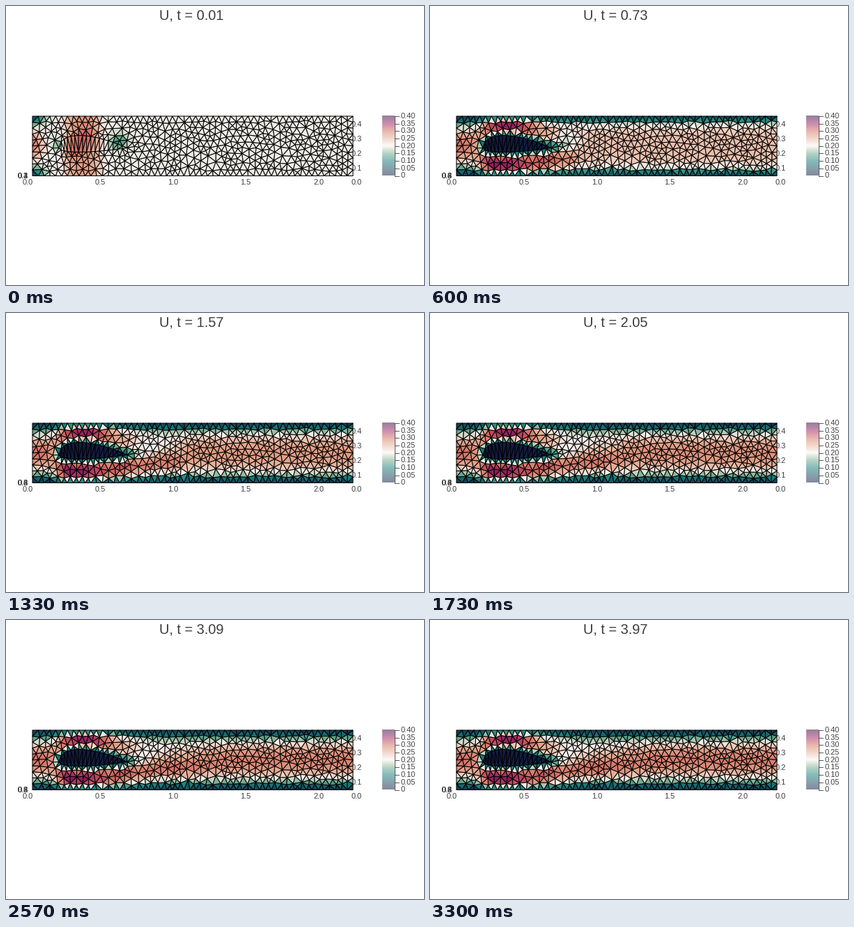
Write a matplotlib script that moves like this. It is 600 px wide and 400 px high and loops after 3330 ms.

```python
import numpy as np
import matplotlib.pyplot as plt
from matplotlib.animation import FuncAnimation
from matplotlib.colors import LinearSegmentedColormap
from matplotlib.tri import Triangulation

W, H, DPI = 600, 400, 100
FRAMES, LOOP = 100, 3330
X0, X1, TOP, BOT = 38, 498, 158, 243.5
MID, HALF = (TOP + BOT) / 2, (BOT - TOP) / 2
NOSE, CHORD, AXIS = 76, 98, 203.5
TAIL = NOSE + CHORD
INK = "#3c3c3c"

plt.rcParams["font.family"] = "Liberation Sans"
curl = LinearSegmentedColormap.from_list("curl", [
    (0.00, "#141d43"), (0.12, "#184b5e"), (0.25, "#14807a"),
    (0.37, "#76ac8f"), (0.45, "#ccd8c6"), (0.50, "#fdf6f4"),
    (0.57, "#eeccbc"), (0.66, "#e1a087"), (0.76, "#d0675f"),
    (0.86, "#a22862"), (0.93, "#6e145a"), (1.00, "#340d35")])


def step(a, b, x):
    s = np.clip((x - a) / (b - a), 0, 1)
    return s * s * (3 - 2 * s)


def bell(x, centre, width, power=2):
    return np.exp(-np.abs((x - centre) / width) ** power)


def foil(x):
    """Upper and lower edge of the body at x."""
    s = np.clip((x - NOSE) / CHORD, 0, 1)
    t = 10 * (0.2969 * np.sqrt(s) - 0.126 * s - 0.3516 * s**2
              + 0.2843 * s**3 - 0.1036 * s**4)
    return AXIS - 18 * t, AXIS + 6 * t


def build_mesh():
    rng = np.random.default_rng(7)
    xs = np.linspace(X0, X1, 56)
    ys = np.linspace(TOP, BOT, 11)[1:-1]
    s = np.linspace(0, 1, 18) ** 1.2
    fx = NOSE + CHORD * s
    up, low = foil(fx)
    body = np.vstack([np.c_[fx, up], np.c_[fx, low][1:-1]])
    pts = [np.c_[xs, 0 * xs + TOP], np.c_[xs, 0 * xs + BOT],
           np.c_[0 * ys + X0, ys], np.c_[0 * ys + X1, ys], body]
    pts = np.vstack(pts)
    fixed = len(pts)
    for p in rng.uniform((X0 + 5, TOP + 6), (X1 - 5, BOT - 6), (9000, 2)):
        a, b = foil(p[0])
        inside = NOSE < p[0] < TAIL and a - 4 < p[1] < b + 4
        if not inside and np.hypot(*(pts - p).T).min() > 7.1:
            pts = np.vstack([pts, p])
    # relax the free nodes towards their neighbours
    for _ in range(5):
        e = Triangulation(*pts.T).edges
        e = np.vstack([e, e[:, ::-1]])
        total = np.zeros_like(pts)
        np.add.at(total, e[:, 0], pts[e[:, 1]])
        count = np.bincount(e[:, 0], minlength=len(pts))
        mean = total / np.maximum(count, 1)[:, None]
        pts[fixed:] += 0.7 * (mean - pts)[fixed:]
    on_body = np.zeros(len(pts), bool)
    on_body[fixed - len(body):fixed] = True
    return Triangulation(*pts.T), on_body


mesh, on_body = build_mesh()
x, y = mesh.x, mesh.y
eta = np.clip(np.abs(y - MID) / HALF, 0, 1)
parabola = 0.3 * (1 - eta**2)


def initial_field():
    along = ((x - 105) * 34 - (y - 195) * 38) / 51
    across = ((x - 105) * 38 + (y - 195) * 34) / 51
    u = (0.195 + 0.07 * bell(x, 110, 27, 4)
         + 0.06 * bell(across, 0, 11) * bell(along, 0, 26, 4)
         - 0.11 * bell(x, 75, 6) * bell(y, 198, 7)
         - 0.10 * bell(x, 162, 11) * bell(y, 194, 8))
    k = bell(x, X0, 14)
    return u + k * (parabola - u)


def gap_field():
    """Flow squeezed between the body and the two walls."""
    up, low = foil(x)
    e_up = 2 * (y - TOP) / (up - TOP) - 1
    e_low = 2 * (y - low) / (BOT - low) - 1
    g_up = (0.24 + 0.13 * bell(x, 112, 42)) * (1 - np.abs(e_up) ** 3)
    g_low = (0.29 + 0.08 * bell(x, 100, 45)) * (1 - np.abs(e_low) ** 3)
    return np.clip(np.where(y < up, g_up, np.where(y > low, g_low, 0)), 0, 1)


start, gap = initial_field(), gap_field()
squeeze = step(62, 84, x) * (1 - step(140, 235, x))
jet = (0.045 * bell(y, 217, 11) * step(130, 170, x) * (1 - step(230, 330, x))
       - 0.06 * bell(y, 190, 12) * step(170, 200, x) * (1 - step(210, 330, x)))


def speed(t):
    n = 2 + 2 * t**-1.5
    u = 0.2 * (n + 1) / n * (1 - eta**n)
    u = u + bell(x, X0, 40) * (parabola - u)
    front = TAIL + 52 * t
    reach = np.where(x > TAIL, 1 - step(front - 20, front + 20, x), 1)
    u = u + reach * (squeeze * (gap - u) + jet * (1 - eta**4))
    u[on_body] = 0
    settled = 1 - np.exp(-(t - 0.01) / 0.04)
    u = start + settled * (u - start)
    return u[mesh.triangles].mean(axis=1)


fig = plt.figure(figsize=(W / DPI, H / DPI), dpi=DPI, facecolor="white")
ax = fig.add_axes([0, 0, 1, 1])


def label(px, py, text, size=11, **kw):
    kw = {"ha": "center", "va": "center", "color": INK, **kw}
    return ax.text(px, py, text, fontsize=size * 72 / DPI, **kw)


# colour bar
ramp = np.linspace(0.4, 0, 200)[:, None]
ax.imshow(ramp, cmap=curl, vmin=0, vmax=0.4, alpha=0.52, aspect="auto",
          extent=(540, 558, BOT, TOP), interpolation="bilinear")
ax.plot([558, 558], [TOP, BOT], color=INK, lw=0.6)
for i in range(9):
    py = BOT - i * (BOT - TOP) / 8
    ax.plot([558, 564], [py, py], color=INK, lw=0.6)
    label(566.5, py, f"{i * 0.05:.2f}" if i else "0", ha="left")

# axis labels
for i in range(5):
    label(31 + 104.4 * i, 253.5, f"{i / 2:.1f}")
    label(503.5, 253.5 - 20.8 * i, f"{i / 10:.1f}", zorder=1)
depth = [label(24, 244, "") for _ in range(4)]

cells = ax.tripcolor(mesh, np.zeros(len(mesh.triangles)), cmap=curl,
                     vmin=0, vmax=0.4, edgecolors="black", linewidth=0.75,
                     zorder=3)
cells.set_antialiased(True)
title = label(266, 19, "", size=20, va="baseline")

ax.set_xlim(0, W)
ax.set_ylim(H, 0)
ax.axis("off")


def draw(k):
    t = 0.01 + 0.04 * k
    title.set_text(f"U, t = {t:.2f}")
    cells.set_array(speed(t))
    for i, mark in enumerate(depth):
        mark.set_text(f"{(i + 1) * (0.2 if k else 0.1):.1f}")
    return [title, cells, *depth]


anim = FuncAnimation(fig, draw, frames=FRAMES, interval=LOOP / FRAMES,
                     repeat=True, repeat_delay=0, blit=False)
plt.show()
```
